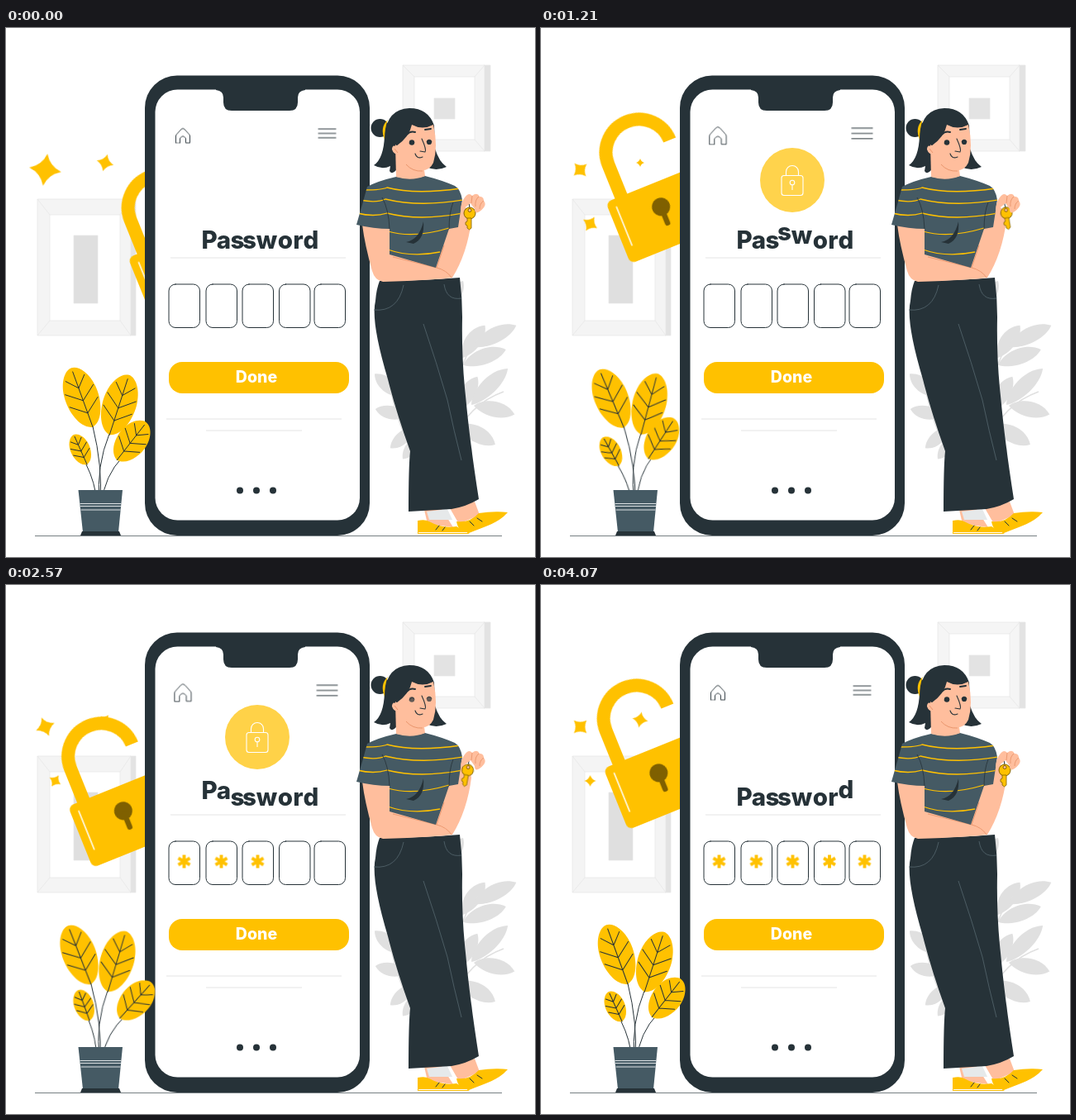
Write an HTML page that moves like this. It is 640 px wide and 640 px high and loops after 4140 ms.

```html
<!DOCTYPE html>
<html lang="en">
<head>
<meta charset="utf-8">
<title>Password</title>
<style>
  html, body { margin: 0; width: 100%; height: 100%; overflow: hidden; background: #fff; }
  svg { display: block; width: 100%; height: 100%; }
  text { font-family: Inter, "Open Sans", sans-serif; font-weight: 800; text-anchor: middle; }
  .line { fill: none; stroke: #263238; stroke-linecap: round; stroke-linejoin: round; }
  .gold { fill: #ffc100; }
  .dark { fill: #263238; }
  .skin { fill: #ffbe9d; }

  .lock, .spark, .tall, .low, .key, .eyes { animation: 4.14s linear infinite; }
  .lock { animation-name: lock; }
  .s1 { animation-name: spark1; }
  .s2 { animation-name: spark2; }
  .s3 { animation-name: spark3; }
  .tall, .low { transform-origin: 114px 572px; }
  .tall { animation-name: tall; }
  .low { animation-name: low; }
  .key { animation-name: swing; }
  .eyes { animation-name: blink; }
  .badge { animation: fade 2.04s linear infinite; }
  .icon { animation: grow 2.04s linear infinite; vector-effect: non-scaling-stroke; }
  .letter { animation: hop 1.965s ease-in-out calc(200ms + var(--i) * 215ms) infinite; }
  .star { animation: show .2s linear calc(1530ms + var(--i) * 395ms) both; }

  @keyframes lock {
    0% { transform: translate(72px, 56px); }
    13.8% { transform: translate(45px, 30px); }
    29.2% { transform: translate(3px, -11px); }
    33% { transform: translate(-3px, -12px); }
    41.3% { transform: translate(-5.5px, -5.5px); }
    52% { transform: translate(-4px, 24px); }
    62.1% { transform: translate(-.5px, 46px); }
    66% { transform: translate(0, 47px); }
    75.8% { transform: translate(0, 35px); }
    98.3%, 100% { transform: none; }
  }
  @keyframes spark1 {
    0% { transform: rotate(8deg) scale(1.95); }
    13.8% { transform: rotate(40deg) scale(1.3); }
    29.2% { transform: rotate(48deg) scale(1.05); }
    41.3% { transform: rotate(90deg) scale(1.1); }
    62.1% { transform: rotate(158deg) scale(1.2); }
    75.8% { transform: rotate(185deg) scale(1.15); }
    98.3%, 100% { transform: rotate(225deg) scale(1.1); }
  }
  @keyframes spark2 {
    0% { transform: rotate(15deg) scale(1.05); }
    13.8% { transform: rotate(40deg) scale(.75); }
    29.2% { transform: rotate(90deg) scale(.5); }
    41.3% { transform: rotate(110deg) scale(.75); }
    75.8% { transform: rotate(135deg) scale(.65); }
    98.3%, 100% { transform: rotate(190deg) scale(.95); }
  }
  @keyframes spark3 {
    0% { transform: scale(0); }
    13.8% { transform: rotate(25deg) scale(1); }
    29.2% { transform: rotate(32deg) scale(1); }
    41.3% { transform: rotate(10deg) scale(.65); }
    62.1% { transform: rotate(32deg) scale(.8); }
    75.8% { transform: rotate(25deg) scale(.85); }
    98.3%, 100% { transform: scale(.7); }
  }
  @keyframes tall {
    13.8% { transform: rotate(-.6deg); }
    29.2% { transform: rotate(-3deg); }
    41.3% { transform: rotate(-3.5deg); }
    62.1% { transform: rotate(-1.4deg); }
    75.8% { transform: rotate(-.9deg); }
    98.3%, 100% { transform: none; }
  }
  @keyframes low {
    13.8% { transform: rotate(-2deg); }
    29.2% { transform: rotate(-5deg); }
    41.3% { transform: rotate(-3deg); }
    62.1% { transform: rotate(4deg); }
    75.8% { transform: rotate(2.5deg); }
    98.3%, 100% { transform: none; }
  }
  @keyframes swing {
    13.8% { transform: rotate(-9deg); }
    21% { transform: rotate(-13deg); }
    29.2% { transform: rotate(-9deg); }
    41.3% { transform: rotate(13deg); }
    51% { transform: rotate(17deg); }
    62.1% { transform: rotate(10deg); }
    75.8% { transform: rotate(-3deg); }
    86% { transform: rotate(-5deg); }
    98.3%, 100% { transform: none; }
  }
  @keyframes blink {
    0%, 10.5%, 17%, 36%, 42.5%, 61.2%, 68%, 84.5%, 91%, 100% { opacity: 1; }
    13%, 14.8%, 38.5%, 39.5%, 64.2%, 65.2%, 87%, 88.5% { opacity: 0; }
  }
  @keyframes fade {
    0%, 95%, 100% { opacity: 0; }
    28% { opacity: .77; }
    42%, 45% { opacity: 1; }
    59% { opacity: .71; }
    84% { opacity: .17; }
  }
  @keyframes grow {
    0%, 95%, 100% { transform: none; }
    28% { transform: scale(1.2); }
    42%, 45% { transform: scale(1.26); }
    59% { transform: scale(1.2); }
    84% { transform: scale(1.07); }
  }
  @keyframes hop {
    0%, 30%, 100% { transform: none; }
    15% { transform: translateY(-11.5px); }
  }
  @keyframes show { from { opacity: 0; } to { opacity: 1; } }
</style>
</head>
<body>
<svg viewBox="0 0 640 640">
  <defs>
    <path id="spark" class="gold" d="M0-10Q2.5-2.5 10 0Q2.5 2.5 0 10Q-2.5 2.5-10 0Q-2.5-2.5 0-10z"/>
    <path id="shade" fill="#e0e0e0" d="M0 0C9-12 35-16 48 0C36 12 12 10 0 0z"/>
    <g id="leaf">
      <path class="gold" d="M0 38C-15 35-22 10-20-8C-18-27-8-38 0-38C8-38 18-27 20-8C22 10 15 35 0 38z"/>
      <path class="line" vector-effect="non-scaling-stroke" d="M0-33V38M0-12L-12-25M0-12L12-25M0 4L-18-10M0 4L18-10M0 20L-18 6M0 20L18 6"/>
    </g>
    <path id="asterisk" fill="none" stroke="#ffc100" stroke-width="3.8" d="M0-8V8M-7-4L7 4M-7 4L7-4"/>
    <clipPath id="shirtClip">
      <path id="shirt" d="M472 180Q450 185 437 192Q431 214 424 238Q445 243 464 243L464 274L520 290L536 243L547 241L552 208Q550 195 543 191Q527 184 507 179Q490 184 472 180z"/>
    </clipPath>
  </defs>

  <!-- wall pictures -->
  <g stroke="#e6e6e6" stroke-width=".7">
    <path fill="#e3e3e3" d="M150 207H157V372H150z"/>
    <path fill="#f4f4f4" d="M38 207H151V372H38z"/>
    <path fill="none" d="M38 207L53 226M151 207L138 226M38 372L53 354M151 372L138 354"/>
    <path fill="#fff" d="M53 226H138V354H53z"/>
    <path fill="#dfdfdf" d="M82 251H111V333H82z"/>
    <path fill="#e3e3e3" d="M578 45H586V149H578z"/>
    <path fill="#f5f5f5" d="M480 45H579V149H480z"/>
    <path fill="none" d="M480 45L494 59M579 45L567 59M480 149L494 135M579 149L567 135"/>
    <path fill="#fff" d="M494 59H567V135H494z"/>
    <path fill="#e3e3e3" d="M518 85H543V110H518z"/>
  </g>

  <!-- grey foliage -->
  <g>
    <path fill="none" stroke="#e0e0e0" stroke-width="1.5" d="M540 525Q535 470 548 420Q560 385 575 368M540 500Q560 455 602 440M490 510Q470 470 462 420"/>
    <use href="#shade" transform="translate(552 399)rotate(-55)"/>
    <use href="#shade" transform="translate(566 386)rotate(-27)scale(1.2 1)"/>
    <use href="#shade" transform="translate(553 408)rotate(-20)scale(1.15 1)"/>
    <use href="#shade" transform="translate(549 462)rotate(-62)scale(.95)"/>
    <use href="#shade" transform="translate(563 456)rotate(-45)scale(1.3 1)"/>
    <use href="#shade" transform="translate(566 457)rotate(12)scale(1.05 1)"/>
    <use href="#shade" transform="translate(547 481)rotate(27)scale(1.05)"/>
    <use href="#shade" transform="translate(538 488)rotate(48)scale(.8)"/>
    <use href="#shade" transform="translate(535 340)rotate(-62)scale(.8)"/>
    <use href="#shade" transform="translate(480 445)rotate(-142)scale(.9)"/>
    <use href="#shade" transform="translate(487 468)rotate(190)scale(.85)"/>
    <use href="#shade" transform="translate(493 482)rotate(137)scale(.8)"/>
    <use href="#shade" transform="translate(502 490)rotate(125)scale(.8)"/>
  </g>

  <path d="M35 614.5H600" stroke="#777f83"/>

  <g transform="translate(47.5 171.5)"><use href="#spark" class="spark s1"/></g>
  <g transform="translate(120 163)"><use href="#spark" class="spark s2"/></g>
  <g transform="translate(59.5 237)"><use href="#spark" class="spark s3"/></g>

  <!-- padlock -->
  <g class="lock">
    <g transform="translate(75.5 222)rotate(-22)">
      <path fill="none" stroke="#ffc100" stroke-width="16" d="M20 4V-41A40 40 0 0 1 100-41"/>
      <rect class="gold" width="120" height="80" rx="7"/>
      <path fill="none" stroke="#fff" stroke-width="1.5" stroke-linecap="round" d="M10 10V60"/>
      <circle cx="60" cy="30" r="11" fill="#7f6000"/>
      <path fill="none" stroke="#7f6000" stroke-width="6.5" stroke-linecap="round" d="M60 34V51"/>
    </g>
  </g>

  <!-- phone -->
  <rect class="dark" x="168" y="57.5" width="272" height="556.5" rx="39"/>
  <rect fill="#fff" x="180.5" y="74.5" width="247.5" height="521" rx="27"/>
  <path class="dark" d="M254 73V75Q263 76 263 84V90Q263 100 273 100H343Q353 100 353 90V84Q353 76 362 75V73z"/>
  <g transform="translate(214 130.5)">
    <path class="line icon" stroke-width=".9" d="M-8.5 8.5V0Q-8.5-1-7-2.5L-2-8Q0-10 2-8L7-2.5Q8.5-1 8.5 0V8.5H3.5V3Q0-2-3.5 3V8.5z"/>
  </g>
  <g transform="translate(388.5 127.5)">
    <path class="line icon" d="M-10.5-5.3H10.5M-10.5 0H10.5M-10.5 5.3H10.5"/>
  </g>
  <g class="badge">
    <circle class="gold" cx="304" cy="184" r="39"/>
    <g fill="none" stroke="#fff" stroke-width="1.1">
      <rect x="291" y="178.5" width="26" height="24" rx="3"/>
      <path d="M296.5 178.5V174A7.5 7.5 0 0 1 311.5 174V178.5M304 190V196"/>
      <circle cx="304" cy="187" r="2.8"/>
    </g>
  </g>
  <g id="word" class="dark" font-size="29.5"></g>
  <path fill="none" stroke="#e4e4e4" d="M199 278H411M194 473H406M242 487H358"/>
  <g id="boxes"></g>
  <rect class="gold" x="197" y="404" width="218" height="38" rx="16"/>
  <text x="303" y="428.5" font-size="19.5" fill="#fff">Done</text>
  <g class="dark"><circle cx="283" cy="559.5" r="4"/><circle cx="303" cy="559.5" r="4"/><circle cx="323" cy="559.5" r="4"/></g>

  <!-- potted plant -->
  <g class="low">
    <path class="line" d="M97 528Q108 550 110 574M141 519Q119 542 116 574"/>
    <use href="#leaf" transform="translate(90 510)rotate(-24)scale(.58 .52)"/>
    <use href="#leaf" transform="translate(152 500)rotate(38)scale(.88 .76)"/>
  </g>
  <g class="tall">
    <path class="line" d="M105 482Q117 530 114 574M125 491Q109 530 113 574"/>
    <use href="#leaf" transform="translate(92 447)rotate(-20)"/>
    <use href="#leaf" transform="translate(137 456)rotate(18)"/>
  </g>
  <path fill="#455a64" d="M87.5 559H141L136 610H93z"/>
  <path class="dark" d="M92 609H137L139 614H90z"/>
  <path fill="none" stroke="#dfe3e5" d="M89.5 575.5H139.5M90 578.5H139M90.5 583H138.5"/>

  <!-- woman -->
  <path class="skin" d="M506 583L527 582L541 604L510 600zM537 581L567 573L573 589L548 600z"/>
  <path fill="#e6e9ea" d="M509 585L534 582L540 595L512 595z"/>
  <path class="gold" d="M498 596Q507 594 512 597Q528 606 545 603L561 612H498z"/>
  <path class="gold" d="M545 597Q561 599 572 587Q590 584 607 586Q598 597 578 604L560 611Q547 610 545 597z"/>
  <path fill="none" stroke="#fff" d="M499 610.5H558"/>
  <path class="line" d="M524 602L520 607M531 604L528 608M561 597L566 602M570 593L576 597"/>
  <path class="dark" d="M452 306Q500 306 549 302Q552 326 552 350Q551 400 556 445Q561 500 572 570Q557 579 539 582L487 585Q487 530 489 512Q472 465 462 425Q441 355 447 330Q448 316 452 306z"/>
  <path fill="none" stroke="#56686f" stroke-width=".8" d="M445 341Q474 344 481 311M530 310Q533 330 551 327M505 358Q521 405 534 450Q542 488 551 523"/>

  <path class="skin" d="M431 238L465 240L466 262L520 280L534 243L549 214Q560 215 563 233Q558 273 540 302Q520 305 456 307Q446 305 443 294Q434 262 431 238z"/>
  <path fill="none" stroke="#e9966d" stroke-width=".9" d="M468 277L521 290Q533 293 539 302M521 290L530 263"/>
  <use href="#shirt" fill="#455a64"/>
  <g clip-path="url(#shirtClip)">
    <path fill="none" stroke="#ffc100" stroke-width="1.3" d="M434 196Q455 196 461 193Q495 202 550 194M428 208Q448 212 459 207Q500 217 553 208M425 224Q445 229 461 224Q500 234 553 224M462 246Q493 255 536 242M462 268Q490 278 525 271"/>
    <path class="dark" d="M484 259Q500 256 505 234Q507 255 493 261z"/>
    <path fill="none" stroke="#263238" stroke-width=".8" d="M464 243Q463 219 455 205M536 244Q536 223 541 211"/>
  </g>

  <ellipse class="dark" cx="452.5" cy="121" rx="11" ry="11"/>
  <path class="dark" d="M458 130Q461 98 488 97Q511 97 518 118L519 146Q524 162 533 168Q520 174 509 168L472 172Q467 178 464 173L465 167Q455 172 445 166Q457 158 458 130z"/>
  <path class="gold" d="M462 111Q452 120 458 135Q458 121 462 111z"/>
  <path class="skin" d="M471 141L472 180Q490 186 507 179L505 165z"/>
  <path class="skin" d="M472 143Q488 132 491 117Q504 124 517 117Q523 143 517 163Q512 174 499 172Q481 168 475 153Q469 153 467 147Q467 141 472 143z"/>
  <path fill="none" stroke="#e9966d" d="M484 165Q492 174 504 173M470 146L474 151"/>
  <path class="line" stroke-width=".8" d="M488 139Q491 134 494 138M509 137Q512 133 515 137"/>
  <g class="eyes dark"><circle cx="491" cy="138.5" r="3.2"/><circle cx="512" cy="138" r="3.1"/></g>
  <path class="line" stroke-width="1.9" d="M485 129Q489 124 495 126M507 123L514 122"/>
  <path class="line" stroke-width="1.1" d="M503 134Q509 147 507 150L501 149M495 152Q497 159 504 156"/>

  <!-- hand and key -->
  <g transform="translate(560 210)">
    <g class="key">
      <path class="line" stroke-width="1" d="M0-1L1 9"/>
      <circle cx="1" cy="14" r="7" fill="#ffc100" stroke="#7f6000"/>
      <circle cx="1" cy="10.5" r="2" fill="#ffbe9d" stroke="#7f6000"/>
      <path fill="#ffc100" stroke="#7f6000" stroke-width=".8" d="M-2 20H3V32L.5 34L-2 32V29L-4 28V25L-2 24z"/>
    </g>
  </g>
  <path class="skin" d="M550 221Q550 211 555 205Q560 198 564 203Q570 198 573 204Q578 204 578 209Q583 215 573 222Q567 226 567 219L562 212L557 216z"/>
  <path fill="none" stroke="#e9966d" stroke-width=".9" d="M564 203L563 212M572 204Q567 208 568 216M578 209Q573 212 573 219"/>
</svg>
<script>
  const letterX = [246, 263.5, 280, 294.5, 315.5, 338, 353.5, 369];
  const boxX = [197, 242, 286, 330.5, 373];

  document.getElementById('word').innerHTML = [...'Password'].map((c, i) =>
    `<text class="letter" style="--i:${i}" x="${letterX[i]}" y="267">${c}</text>`).join('');

  document.getElementById('boxes').innerHTML = boxX.map((x, i) =>
    `<rect class="line" x="${x}" y="310" width="37.5" height="52.5" rx="8"/>
     <g transform="translate(${x + 18.5} 334.5)"><use href="#asterisk" class="star" style="--i:${i}"/></g>`).join('');

  // Play every animation on one shared clock that advances in even steps.
  const loop = 4140, steps = 58;
  const animations = document.getAnimations();
  animations.forEach(a => a.pause());
  let start;

  function tick(now) {
    start ??= now;
    const step = Math.min(steps - 1, Math.floor((now - start) % loop / loop * steps + 0.06));
    animations.forEach(a => { a.currentTime = step * loop / steps; });
    requestAnimationFrame(tick);
  }
  requestAnimationFrame(tick);
</script>
</body>
</html>
```
